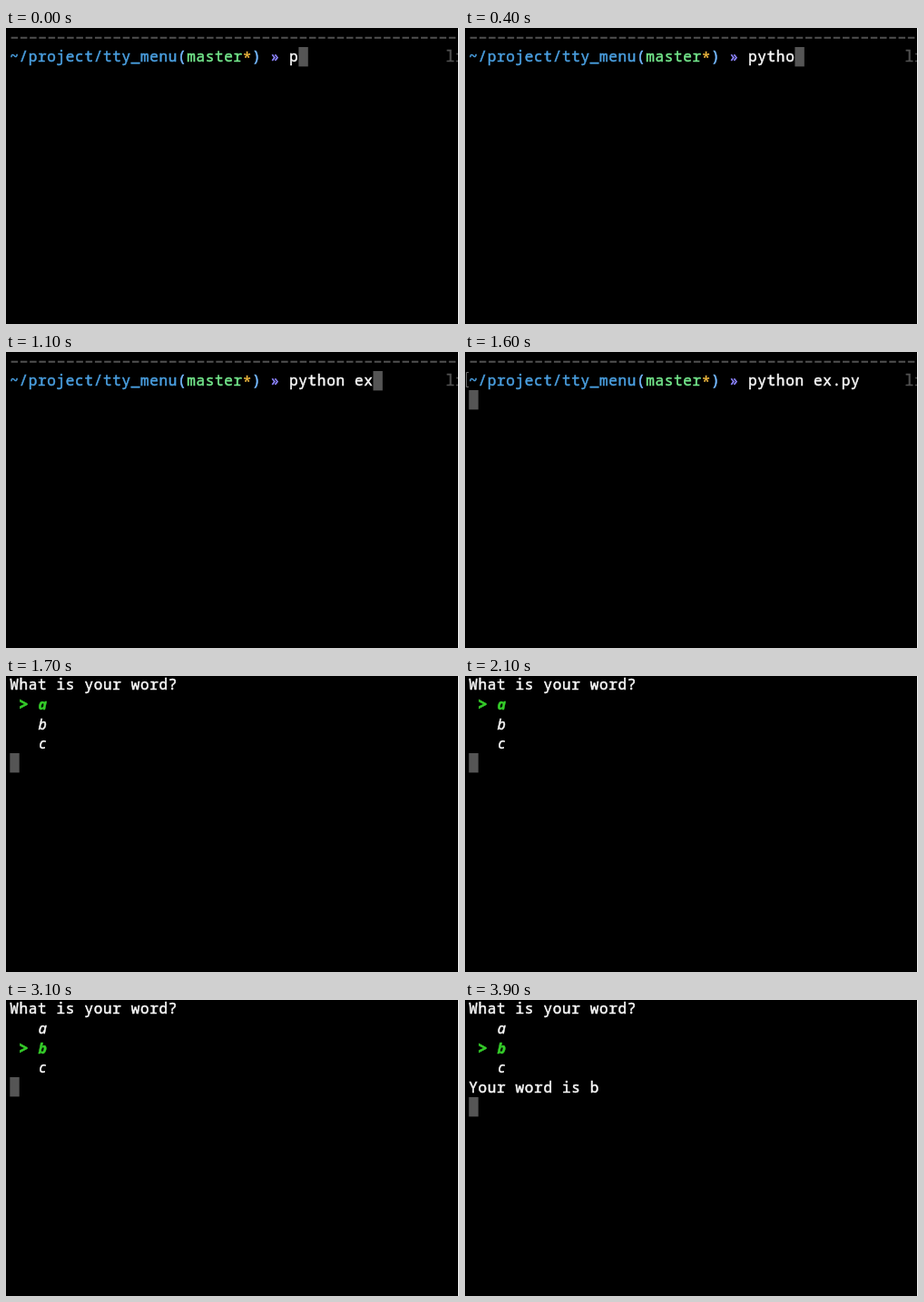
These frames come from a looping animation (499 by 326 pixels, 4 s). An HTML page:

```html
<!DOCTYPE html>
<html lang="en">
<head>
<meta charset="utf-8">
<title>Terminal menu</title>
<style>
  html, body { margin: 0; width: 100%; height: 100%; overflow: hidden; background: #000; }
  svg { display: block; width: 499px; height: 326px; }
  text {
    font: 500 16px "Noto Sans Mono", "DejaVu Sans Mono", monospace;
    letter-spacing: .66px;
    white-space: pre;
    fill: currentColor;
    stroke: currentColor;
    stroke-width: .5px;
  }
  .pointer { font-size: 19px; font-weight: 700; }
  .item {
    font-family: "Noto Sans", "Open Sans", sans-serif;
    font-style: italic;
    letter-spacing: 0;
    text-anchor: middle;
  }
  .picked { font-weight: 700; }
</style>
</head>
<body>
<svg id="term" viewBox="0 0 499 326" xmlns="http://www.w3.org/2000/svg"></svg>
<script>
const NS = "http://www.w3.org/2000/svg";
const LOOP = 4000, CELL = 10.26, LINE = 21.6, LEFT = 4.3, TOP = -1.1, BASE = 16.4;
const WHITE = "#f8f8f8", GREEN = "#35cc2a", GRAY = "#505050";
const term = document.getElementById("term");

function add(parent, tag, attrs, content = "") {
  const node = document.createElementNS(NS, tag);
  for (const key in attrs) node.setAttribute(key, attrs[key]);
  node.textContent = content;
  return parent.appendChild(node);
}

const group = () => add(term, "g", {});
const show = (node, on) => node.setAttribute("visibility", on ? "visible" : "hidden");

function write(parent, row, col, content, color = WHITE, dy = 0) {
  return add(parent, "text", {
    x: LEFT + col * CELL, y: TOP + BASE + row * LINE + dy, color
  }, content);
}

// [start time, value], the last one reached applies
const at = (steps, t) => steps.reduce((value, [start, next]) => t >= start ? next : value, steps[0][1]);

const typed = [
  [0, "p"], [100, "py"], [200, "pyt"], [300, "pyth"], [400, "pytho"], [500, "python"],
  [700, "python "], [900, "python e"], [1000, "python ex"], [1200, "python ex.py "]
];
const picks = [[1700, 0], [2400, 1], [2600, 2], [2800, 1]];
const ENTER = 1300, MENU = 1700, ANSWER = 3300;

add(term, "rect", { x: 498, width: 1, height: 326, fill: "#fff" });
const cursor = add(term, "rect", { width: 10.4, height: 21.4, fill: "#555" });

const shell = group();
add(shell, "path", {
  d: "M5.6 10.7H496", stroke: GRAY, "stroke-width": 1.9, "stroke-dasharray": `7.5 ${CELL - 7.5}`
});
let col = 0;
for (const [part, color, dy] of [
  ["~/project/tty_menu", "#4a9fe0"], ["(", "#74b9ff"], ["master", "#74e88c"],
  ["*", "#e8b23c", 2.5], [")", "#74b9ff"], [" » ", "#8f86ff"]
]) {
  write(shell, 1, col, part, color, dy);
  col += part.length;
}
const command = write(shell, 1, col, "");
write(shell, 1, 46.8, "li", GRAY);
const mark = add(shell, "path", { d: "M4 22.5H1.5V38.5H4", fill: "none", stroke: "#666", "stroke-width": 1 });

// Keeps the prompt clear of the right border
add(term, "rect", { x: 498, width: 1, height: 326, fill: "#fff" });

const menu = group();
write(menu, 0, 0, "What is your word?");
const pointer = write(menu, 0, .93, ">", GREEN);
pointer.setAttribute("class", "pointer");
const items = [..."abc"].map((name, i) => write(menu, i + 1, 3.5, name));
const answer = write(menu, 4, 0, "Your word is b");

function draw(t) {
  const inMenu = t >= MENU, done = t >= ANSWER;
  const input = at(typed, t), pick = at(picks, t);

  show(shell, !inMenu);
  show(menu, inMenu);
  command.textContent = input;
  show(mark, !inMenu && t >= 1200);

  pointer.setAttribute("y", TOP + BASE + (pick + 1) * LINE + 1);
  items.forEach((item, i) => {
    item.setAttribute("color", i === pick ? GREEN : WHITE);
    item.setAttribute("class", i === pick ? "item picked" : "item");
  });
  show(answer, inMenu && done);

  const row = done ? 5 : inMenu ? 4 : t >= ENTER ? 2 : 1;
  const cursorCol = row === 1 ? col + input.length : 0;
  cursor.setAttribute("x", LEFT + cursorCol * CELL);
  cursor.setAttribute("y", Math.round(TOP + row * LINE));
}

const start = performance.now();
function tick() {
  draw((performance.now() - start) % LOOP);
  requestAnimationFrame(tick);
}
tick();
</script>
</body>
</html>
```
